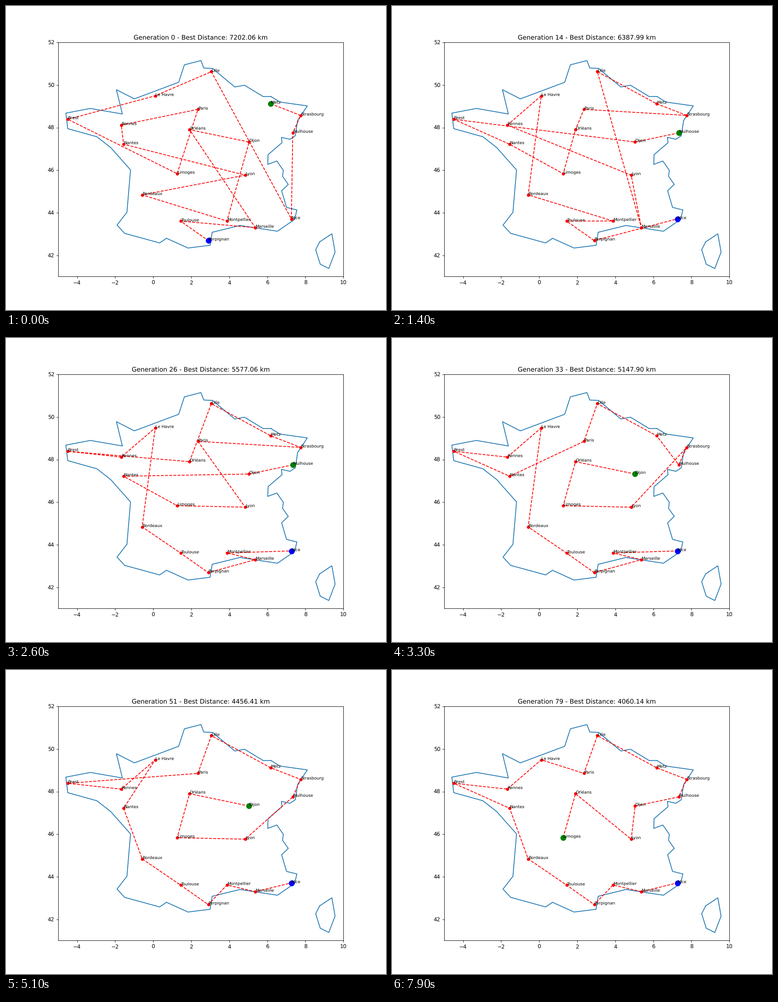
A matplotlib script that plays this animation: 837x669 px, repeating every 8000 ms.

```python
from math import cos, radians

import matplotlib.pyplot as plt
from matplotlib.animation import FuncAnimation

WIDTH, HEIGHT, DPI = 837, 669, 83.66
FRAMES, INTERVAL = 80, 100
WEST, EAST, SOUTH, NORTH = -5, 10, 41, 52

plt.rcParams["font.family"] = "DejaVu Sans"
plt.rcParams["text.hinting"] = "no_hinting"

# key: (name, longitude, latitude)
CITIES = {
    "P": ("Paris", 2.352, 48.857),
    "M": ("Marseille", 5.37, 43.297),
    "Y": ("Lyon", 4.836, 45.764),
    "T": ("Toulouse", 1.444, 43.605),
    "N": ("Nice", 7.262, 43.71),
    "A": ("Nantes", -1.554, 47.218),
    "S": ("Strasbourg", 7.752, 48.573),
    "C": ("Montpellier", 3.877, 43.611),
    "B": ("Bordeaux", -0.579, 44.838),
    "L": ("Lille", 3.057, 50.629),
    "R": ("Rennes", -1.678, 48.117),
    "H": ("Le Havre", 0.108, 49.494),
    "Z": ("Metz", 6.176, 49.119),
    "D": ("Dijon", 5.042, 47.322),
    "G": ("Limoges", 1.261, 45.834),
    "O": ("Orléans", 1.909, 47.903),
    "W": ("Brest", -4.486, 48.39),
    "E": ("Perpignan", 2.895, 42.689),
    "U": ("Mulhouse", 7.336, 47.751),
}

# corner points of the coast and border
MAINLAND = [
    (6.19, 49.46), (6.66, 49.20), (8.10, 49.02), (7.59, 48.33), (7.47, 47.62),
    (7.19, 47.45), (6.74, 47.54), (6.77, 47.29), (6.04, 46.73), (6.02, 46.27),
    (6.50, 46.43), (6.84, 45.99), (6.80, 45.71), (7.10, 45.33), (6.75, 45.03),
    (7.01, 44.25), (7.55, 44.13), (7.44, 43.69), (6.53, 43.13), (4.56, 43.40),
    (3.10, 43.08), (2.99, 42.47), (1.83, 42.34), (0.70, 42.80), (0.34, 42.58),
    (-1.50, 43.03), (-1.90, 43.42), (-1.38, 44.02), (-1.19, 46.01),
    (-2.23, 47.06), (-2.96, 47.57), (-4.49, 47.95), (-4.59, 48.68),
    (-3.30, 48.90), (-1.62, 48.64), (-1.93, 49.78), (-0.99, 49.35),
    (1.34, 50.13), (1.64, 50.95), (2.51, 51.15), (2.66, 50.80), (3.12, 50.78),
    (4.29, 49.91), (4.80, 49.99), (5.78, 49.46),
]
ISLAND = [(8.75, 42.63), (9.39, 43.01), (9.56, 42.15), (9.23, 41.38),
          (8.78, 41.58), (8.54, 42.26)]

# milestones: (generation, best distance in km, visiting order)
BEST = [
    (0, 7202.06, "ZSUNLHWGPRAYBCDOMTE"),
    (9, 6526.43, "UDWAGOPSZLMYRHBCTEN"),
    (19, 6249.54, "UDWAGOPSZLYTBHRCMEN"),
    (26, 5577.06, "UDAGYPSZLOWRHBTEMCN"),
    (40, 4718.74, "DOGYSUZLPWRHABTCEMN"),
    (51, 4456.41, "DOGYUSZLPWRHABTECMN"),
    (79, 4060.14, "GOYDUSZLPHRWABTECMN"),
]


def crossover(old, new, cut):
    """Head of the new order, then the remaining cities in the old order."""
    head = new[:cut]
    return head + "".join(c for c in old if c not in head)


def best_at(gen):
    """Go from one milestone to the next by way of a half crossover."""
    for (g0, km0, old), (g1, km1, new) in zip(BEST, BEST[1:]):
        if gen < g1:
            step = 3 * (gen - g0) // (g1 - g0)
            return (km0 + (km1 - km0) * step / 2,
                    crossover(old, new, step * len(new) // 2))
    return BEST[-1][1:]


# the tiny margin keeps the pixel size from rounding down
fig = plt.figure(figsize=((WIDTH + 1e-6) / DPI, (HEIGHT + 1e-6) / DPI), dpi=DPI)

# map aspect for a mid latitude of 26.6 degrees on a 10 x 8 sheet
box_h = 0.77
box_w = box_h * 8 / 10 * (EAST - WEST) / (NORTH - SOUTH) * cos(radians(26.6))
ax = fig.add_axes([0.5125 - box_w / 2, 0.11, box_w, box_h])
ax.set_xlim(WEST, EAST)
ax.set_ylim(SOUTH, NORTH)

for coast in (MAINLAND, ISLAND):
    ax.plot(*zip(*coast, coast[0]), color="C0", lw=1.5)

for name, lon, lat in CITIES.values():
    ax.plot(lon, lat, "ro", markersize=5)
    ax.text(lon, lat, name, fontsize=8)

route, = ax.plot([], [], "r--", lw=1.5)
start, = ax.plot([], [], "go", markersize=10)
end, = ax.plot([], [], "bo", markersize=10)
title = ax.set_title("")


def update(gen):
    km, order = best_at(gen)
    points = [CITIES[key][1:] for key in order]
    route.set_data(*zip(*points))
    start.set_data(*zip(points[0]))
    end.set_data(*zip(points[-1]))
    title.set_text(f"Generation {gen} - Best Distance: {km:.2f} km")
    return route, start, end, title


anim = FuncAnimation(fig, update, frames=FRAMES, interval=INTERVAL,
                     repeat=True, repeat_delay=0, blit=False)
plt.show()
```
